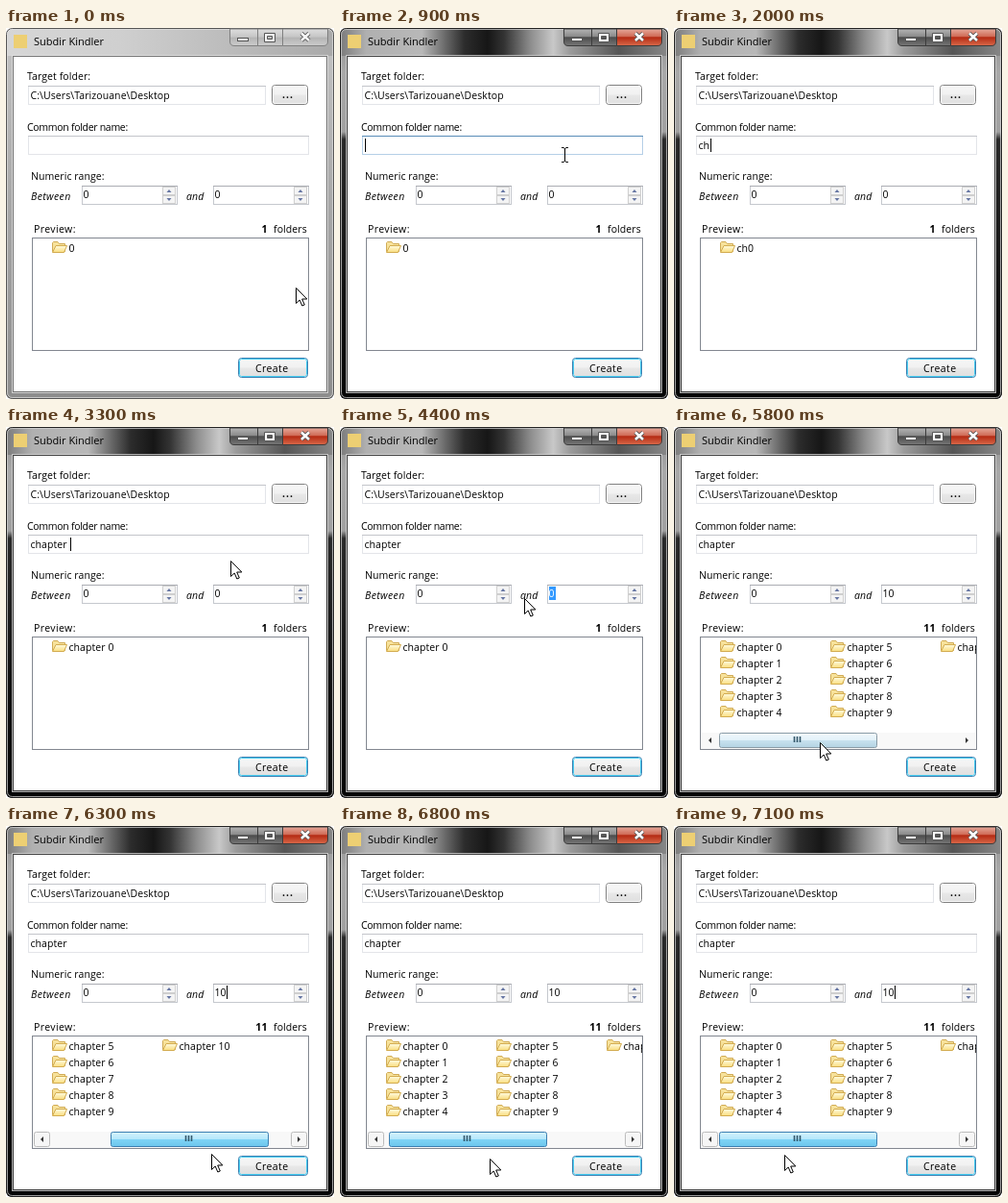
An HTML page for the animation above (7200 ms loop, 342 by 386 pixels).

```html
<!DOCTYPE html>
<html lang="en">
<head>
<meta charset="utf-8">
<title>Folder batch dialog</title>
<style>
  html, body { margin: 0; width: 100%; height: 100%; overflow: hidden; background: #fff; }
  svg { display: block; width: 342px; height: 386px; }
  text { font: 10.5px "Open Sans", "Noto Sans", sans-serif; letter-spacing: .08px; white-space: pre; fill: #000; }
  .caption { font-size: 11px; letter-spacing: 0; }
  .wide { letter-spacing: .4px; }
  .tight { letter-spacing: -.3px; }
  .italic { font-style: italic; }
  .bold { font-weight: 700; }
</style>
</head>
<body>
<svg id="stage" viewBox="0 0 342 386" xmlns="http://www.w3.org/2000/svg"></svg>
<script>
const LOOP = 7200, TICK = 100;
const stage = document.getElementById('stage');

const rect = (x, y, w, h, fill, extra = '') =>
  `<rect x="${x}" y="${y}" width="${w}" height="${h}" fill="${fill}" ${extra}/>`;
const box = (x, y, w, h, fill, stroke, extra = '') =>
  rect(x + .5, y + .5, w - 1, h - 1, fill, `stroke="${stroke}" ${extra}`);
const path = (d, fill, extra = '') => `<path d="${d}" fill="${fill}" ${extra}/>`;
const label = (x, y, text, cls = '', extra = '') =>
  `<text x="${x}" y="${y}" class="${cls}" ${extra}>${text}</text>`;
const gradient = (id, stops, vertical = true) =>
  `<linearGradient id="${id}" x2="${vertical ? 0 : 1}" y2="${vertical ? 1 : 0}">` +
  stops.map(([at, color]) => `<stop offset="${at}" stop-color="${color}"/>`).join('') +
  '</linearGradient>';

const defs = `<defs>
  ${gradient('idleBar', [[0, '#d6d6d6'], [.35, '#cfcfcf'], [1, '#a9a9a9']], false)}
  ${gradient('idleSide', [[0, '#c4c4c4'], [.5, '#a6a6a6'], [1, '#8d8d8d']])}
  ${gradient('liveBar', [[0, '#7a7a7a'], [.08, '#b0b0b0'], [.25, '#b8b8b8'], [.32, '#6a6a6a'], [.38, '#2c2c2c'], [.45, '#161616'], [.5, '#333'], [.58, '#8c8c8c'], [.65, '#c8c8c8'], [.7, '#9c9c9c'], [.85, '#555'], [1, '#888']], false)}
  ${gradient('liveSide', [[0, '#8f8f8f'], [.12, '#a8a8a8'], [.28, '#a0a0a0'], [.3, '#2a2a2a'], [.7, '#101010'], [1, '#050505']])}
  ${gradient('idleButton', [[0, '#dedede'], [.48, '#c5c5c5'], [.5, '#b3b3b3'], [1, '#cbcbcb']])}
  ${gradient('liveButton', [[0, '#b4b4b4'], [.45, '#8a8a8a'], [.5, '#4c4c4c'], [1, '#777']])}
  ${gradient('closeButton', [[0, '#e6a99b'], [.45, '#cf6a55'], [.5, '#b42a13'], [1, '#d9694a']])}
  ${gradient('face', [[0, '#f7f7f7'], [.48, '#f1f1f1'], [.52, '#e8e8e8'], [1, '#dedede']])}
  ${gradient('thumbIdle', [[0, '#f5f5f5'], [.48, '#e8e8ea'], [.5, '#d6d7da'], [1, '#c3c4c7']])}
  ${gradient('thumbHover', [[0, '#f1f8fc'], [.48, '#e2f1f9'], [.5, '#c8e2ef'], [1, '#b4d3e3']])}
  ${gradient('thumbDown', [[0, '#d5f2fd'], [.48, '#b5e8fb'], [.5, '#80d4f6'], [1, '#6cc6ec']])}
  ${gradient('folderFront', [[0, '#fffbe0'], [1, '#f9dd7e']])}
  <clipPath id="frameClip"><rect width="342" height="386" rx="6"/></clipPath>
  <clipPath id="listClip"><rect x="28" y="219" width="287" height="99"/></clipPath>
  <g id="folder">
    ${path('M.5 12.5V3.5L1.5 2.5H6L7.5 4.5H13.5V12.5Z', '#f7e29b', 'stroke="#d0ab55"')}
    ${path('M.5 13.5L4 6.5H15.5L12.5 13.5Z', 'url(#folderFront)', 'stroke="#d3ac50"')}
  </g>
</defs>`;

function windowFrame(id, live) {
  const tone = live ? 'live' : 'idle';
  const edge = live ? '#222' : '#555';
  const shine = live ? '#d8d8d8' : '#e2e2e2';
  const glyph = live ? '#fff' : '#f7f7f7';
  const button = `url(#${tone}Button)`;
  const rim = `stroke="${live ? '#3c3c3c' : '#808080'}"`;
  return `<g id="${id}"><g clip-path="url(#frameClip)">
    ${rect(0, 0, 342, 386, `url(#${tone}Side)`)}
    ${rect(0, 0, 342, 29, `url(#${tone}Bar)`)}
    ${box(0, 0, 342, 386, 'none', edge, 'rx="6"')}
    ${box(1, 1, 340, 384, 'none', shine, 'rx="5" opacity=".7"')}
    ${path('M233.5 1V14Q233.5 18.5 238 18.5H288.5V1Z', button, rim)}
    ${path('M288.5 1V18.5H331Q335.5 18.5 335.5 14V1Z', live ? 'url(#closeButton)' : button, rim)}
    ${path('M262.5 1V18', 'none', rim)}
    ${box(241, 10, 12, 4, glyph, '#555')}
    ${path('M269.5 5.5H280.5V14.5H269.5ZM272.5 8.5V11.5H277.5V8.5Z', glyph, 'stroke="#555" fill-rule="evenodd"')}
    ${path('M308 5.5L316 13M316 5.5L308 13', 'none', 'stroke="#555" stroke-width="4.4"')}
    ${path('M308 5.5L316 13M316 5.5L308 13', 'none', `stroke="${glyph}" stroke-width="2.4"`)}
    ${box(6, 28, 330, 352, 'none', shine, 'opacity=".8"')}
    ${box(7, 29, 328, 350, '#fff', live ? '#444' : '#777')}
  </g></g>`;
}

const field = (x, y, w, h) => box(x, y, w, h, '#fff', '#e3e5e9') + rect(x, y, w, 1, '#c3c5ca');

function spinner(x) {
  const bx = x + 84;
  const half = y => box(bx, y, 14, 9, '#f4f4f4', '#cfcfcf');
  return box(x, 164, 100, 20, '#fff', '#c5c8ce') + rect(x, 164, 100, 1, '#abadb3') +
    half(165) + half(174) +
    path(`M${bx + 4.5} 171h5l-2.5-3z`, '#6676a3') +
    path(`M${bx + 4.5} 177h5l-2.5 3z`, '#6676a3');
}

const button = (x, y, w, h, edge) =>
  box(x, y, w, h, 'url(#face)', edge, 'rx="3"') +
  box(x + 1, y + 1, w - 2, h - 2, 'none', '#fbfbfb', 'rx="2"');

const scrollArrow = (x, dir) => {
  const cx = x + 8.5;
  return box(x, 318, 17, 16, '#f6f6f6', '#bcbcbc', 'rx="2" class="arrowBox"') +
    path(`M${cx - 1.5 * dir} 323v6l${3 * dir} -3z`, '#333');
};

const listItem = i => {
  const x = 48 + 115 * Math.floor(i / 5), y = 221 + 17 * (i % 5);
  return `<g class="item"><use href="#folder" x="${x}" y="${y - 1}"/>${label(x + 17.5, y + 12, '')}</g>`;
};

stage.innerHTML = defs +
  windowFrame('idleFrame', false) + windowFrame('liveFrame', true) +
  rect(8, 7, 14, 14, '#edcf73') +
  label(29, 18, 'Subdir Kindler', 'caption') +
  label(22, 54, 'Target folder:') +
  field(23, 60, 248, 20) + label(25.5, 74, 'C:\\Users\\Tarizouane\\Desktop') +
  button(277, 59, 38, 21, '#808080') + label(288, 73, '...', 'bold', 'style="letter-spacing:1px"') +
  label(22, 107, 'Common folder name:', 'tight') +
  field(23, 112, 293, 20) +
  `<g id="hotBorder">${box(23, 112, 293, 20, 'none', '#b5cfe7')}${rect(23, 112, 293, 1, '#5a8db8')}</g>` +
  label(25.5, 126, '', '', 'id="nameText"') +
  label(26, 158, 'Numeric range:') +
  label(26, 179, 'Between', 'italic wide') + spinner(79) + label(80.5, 177, '0') +
  label(188, 179, 'and', 'italic') + spinner(216) +
  rect(218, 166, 7, 14, '#3399ff', 'id="selection"') + label(217.5, 177, '', '', 'id="endText"') +
  rect(0, 0, 1, 14, '#000', 'id="caret"') +
  label(29, 213, 'Preview:', 'wide') +
  label(272.5, 213, '', 'bold', 'id="count" text-anchor="end"') + label(279, 213, 'folders') +
  box(27, 218, 289, 118, '#fff', '#828790') +
  `<g clip-path="url(#listClip)"><g id="list">${Array.from({ length: 11 }, (_, i) => listItem(i)).join('')}</g></g>` +
  `<g id="scroll">${rect(28, 318, 287, 17, '#f8f8f8')}${scrollArrow(29, -1)}${scrollArrow(297, 1)}
    <g id="thumb">${box(47, 318, 165, 16, 'url(#thumbIdle)', '#8a9299', 'rx="2" id="thumbFace"')}
    ${path('M125.5 322v6M128.5 322v6M131.5 322v6', 'none', 'stroke="#33586b" stroke-width="1.6"')}</g></g>` +
  button(242, 343, 73, 21, '#3c7fb1') + box(243, 344, 71, 19, 'none', '#48cdf0', 'rx="2"') +
  label(260, 358, 'Create', 'wide') +
  `<g id="arrow">${path('M.5 .5V16.5L4.2 13L6.8 19L9.3 18L6.7 12H11.8Z', '#fff', 'stroke="#000"')}</g>
   <g id="beam">${path('M-3 -7.5H-1L0.5 -6.5L2 -7.5H4M.5 -6.5V6.5M-3 7.5H-1L.5 6.5L2 7.5H4', 'none', 'stroke="#000"')}</g>`;

const el = Object.fromEntries([...stage.querySelectorAll('[id]')].map(node => [node.id, node]));
const items = [...stage.querySelectorAll('.item')];
const arrowBoxes = [...stage.querySelectorAll('.arrowBox')];

const show = (node, on) => { node.style.display = on ? '' : 'none'; };
const latest = (keys, t) => keys.filter(([at]) => at <= t).pop()[1];
const within = (t, from, to) => t >= from && t < to;

const nameKeys = [[0, ''], [1600, 'c'], [2000, 'ch'], [2100, 'cha'], [2300, 'chap'],
  [2600, 'chapt'], [2800, 'chapte'], [2900, 'chapter'], [3200, 'chapter ']];
const endKeys = [[0, 0], [4800, 1], [5000, 10]];
const caretKeys = [[0, ''], [900, 'name'], [1400, ''], [1600, 'name'], [3700, ''],
  [4800, 'end'], [5500, ''], [6000, 'end'], [6500, ''], [7100, 'end']];
const thumbKeys = [[0, 'Idle'], [5800, 'Hover'], [5900, 'Down']];

// Pointer stops: time, x, y
const pointerStops = [[0, 302, 270], [800, 236, 134], [900, 234, 132], [3200, 234, 132],
  [3800, 232, 172], [4000, 228, 173], [4400, 192, 178], [5400, 192, 178],
  [5800, 152, 328], [5900, 153, 328], [6300, 214, 341], [6700, 170, 347], [7100, 115, 342]];

function pointerAt(t) {
  const next = pointerStops.findIndex(stop => stop[0] > t);
  if (next < 0) return pointerStops[pointerStops.length - 1].slice(1);
  const [t0, x0, y0] = pointerStops[next - 1], [t1, x1, y1] = pointerStops[next];
  const k = (t - t0) / (t1 - t0);
  return [x0 + (x1 - x0) * k, y0 + (y1 - y0) * k].map(Math.round);
}

function drawPointer(t, x, y) {
  const visible = !within(t, 1600, 3300) && !within(t, 4800, 5500);
  const overText = (y >= 112 && y <= 134 && x < 316) || (y >= 164 && y < 184 && x >= 216 && x < 300);
  show(el.arrow, visible && !overText);
  show(el.beam, visible && overText);
  for (const node of [el.arrow, el.beam]) node.setAttribute('transform', `translate(${x} ${y})`);
}

function drawCaret(where) {
  show(el.caret, where);
  if (!where) return;
  const text = where === 'name' ? el.nameText : el.endText;
  const width = text.textContent ? text.getComputedTextLength() : 0;
  el.caret.setAttribute('x', Math.round(+text.getAttribute('x') + width + .5));
  el.caret.setAttribute('y', where === 'name' ? 115 : 166);
}

function drawList(name, end, drag) {
  items.forEach((item, i) => {
    show(item, i <= end);
    item.lastChild.textContent = name + i;
  });
  el.count.textContent = end + 1;
  el.list.setAttribute('transform', `translate(${drag > 43 ? -115 : 0} 0)`);
}

function drawScroll(end, drag, tone) {
  show(el.scroll, end === 10);
  el.thumb.setAttribute('transform', `translate(${drag} 0)`);
  el.thumbFace.setAttribute('fill', `url(#thumb${tone})`);
  el.thumbFace.setAttribute('stroke', tone === 'Down' ? '#3c7fb1' : '#8a9ba6');
  arrowBoxes.forEach(node => show(node, tone === 'Down'));
}

function render(time) {
  const t = Math.floor(time / TICK) * TICK;
  const [x, y] = pointerAt(t);
  const name = latest(nameKeys, t), end = latest(endKeys, t);
  const drag = t >= 5900 ? Math.max(0, Math.min(86, x - 152)) : 0;
  const selected = within(t, 4200, 4800);

  show(el.idleFrame, t < 900);
  show(el.liveFrame, t >= 900);
  show(el.hotBorder, within(t, 800, 1600));
  el.nameText.textContent = name;
  el.endText.textContent = end;
  el.endText.style.fill = selected ? '#fff' : '#000';
  show(el.selection, selected);
  drawList(name, end, drag);
  drawScroll(end, drag, latest(thumbKeys, t));
  drawCaret(latest(caretKeys, t));
  drawPointer(t, x, y);
}

const start = performance.now();
function frame() {
  render((performance.now() - start) % LOOP);
  requestAnimationFrame(frame);
}
frame();
</script>
</body>
</html>
```
